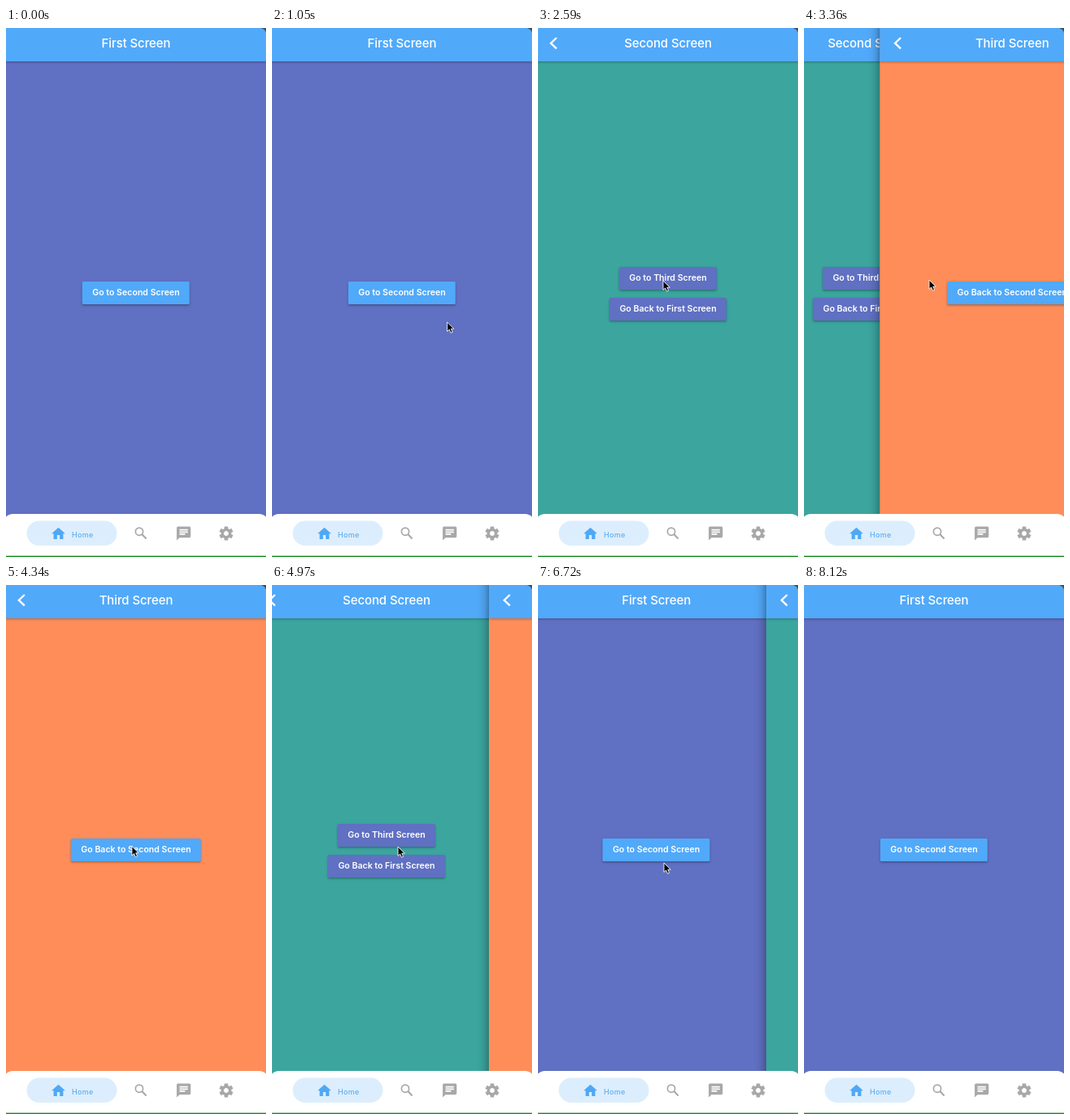
These frames come from a looping animation (320x651 px, 8.19 s). An HTML page:

```html
<!DOCTYPE html>
<html lang="en">
<head>
<meta charset="utf-8">
<title>Stacked screens</title>
<style>
  html, body { margin: 0; width: 100%; height: 100%; overflow: hidden; }
  body { position: relative; background: #6070c2; font-family: Inter, "Liberation Sans", sans-serif; }
  #stage { position: absolute; left: 0; top: 0; width: 320px; height: 651px; overflow: hidden; }
  .page { position: absolute; left: -3.5px; top: 0; width: 327px; height: 651px; background: var(--bg); }
  .page + .page::before {
    content: ""; position: absolute; right: 100%; top: 0; width: 16px; height: 100%;
    background: linear-gradient(90deg, transparent, rgba(0,0,0,.02) 30%, rgba(0,0,0,.08) 60%, rgba(0,0,0,.24));
  }
  header {
    position: absolute; left: 0; top: 0; width: 100%; height: 41px; background: #51a9f9;
    box-shadow: 0 1px 3px rgba(0,0,0,.3); color: #fff; text-align: center;
    font-size: 15px; font-weight: 500; letter-spacing: -.1px; line-height: 38px;
  }
  header svg { position: absolute; left: 0; top: 0; }
  .btn {
    position: absolute; left: 50%; height: 28px; padding: 0 12.5px; transform: translateX(-50%);
    border-radius: 1.6px; background: var(--btn); color: #fff; white-space: nowrap;
    font-size: 10.6px; font-weight: 600; line-height: 28px; box-shadow: 0 1.5px 2.5px rgba(0,0,0,.3);
  }
  .btn.down { box-shadow: 0 2px 4px rgba(0,0,0,.35), inset 0 0 0 20px rgba(0,0,0,.06); }
  #nav, #cursor { position: absolute; left: 0; top: 0; }
</style>
</head>
<body>
<div id="stage">
  <section class="page" style="--bg:#6070c2; --btn:#51a9f9">
    <header>First Screen</header>
    <div class="btn" style="top:312.3px">Go to Second Screen</div>
  </section>
  <section class="page" style="--bg:#3ba59e; --btn:#6070c2">
    <header>Second Screen</header>
    <div class="btn" style="top:293.6px">Go to Third Screen</div>
    <div class="btn" style="top:331.6px">Go Back to First Screen</div>
  </section>
  <section class="page" style="--bg:#fe8d59; --btn:#51a9f9">
    <header>Third Screen</header>
    <div class="btn" style="top:312.3px">Go Back to Second Screen</div>
  </section>

  <svg id="nav" width="320" height="651">
    <path d="M314 0H320V6Q319 1.500 314 0Z" fill="#3d4c60"/>
    <rect x="-3.500" y="598" width="327" height="70" rx="12" fill="#fff"/>
    <rect x="25.500" y="606.500" width="111" height="30.500" rx="15.250" fill="#dceefd"/>
    <path transform="translate(64.500 622) scale(.84) translate(-12 -11.700)" fill="#4fa8f5"
      d="M10 20v-6h4v6h5v-8h3L12 3 2 12h3v8z"/>
    <text x="81" y="626.700" font-size="9" letter-spacing=".3" font-weight="500" fill="#62aeef">Home</text>
    <g fill="none" stroke="#a8a8a8">
      <circle cx="164" cy="619.700" r="4.600" stroke-width="1.700"/>
      <path d="M167.300 623.100L172.600 628.400" stroke-width="2.100"/>
    </g>
    <path transform="translate(218.700 622) scale(.86) translate(-12 -12)" fill="#a8a8a8"
      d="M4 2h16a2 2 0 0 1 2 2v12a2 2 0 0 1-2 2H6l-4 4V4a2 2 0 0 1 2-2zM6 6v2h12V6zM6 9v2h12V9zM6 12v2h8v-2z" fill-rule="evenodd"/>
    <g id="gear" transform="translate(271 622)" stroke="#a8a8a8" stroke-width="4.600">
      <circle r="4.700" fill="none" stroke-width="3.400"/>
    </g>
    <rect y="649.600" width="320" height="1.400" fill="#15881c"/>
  </svg>

  <svg id="cursor" width="14" height="18" style="overflow:visible">
    <path d="M0 0V11.400L2.600 9 4.500 13.200 6.600 12.300 4.800 8.200H8.300Z" fill="#000" stroke="#fff" stroke-width=".9" stroke-linejoin="round"/>
  </svg>
</div>
<script>
const LOOP = 8190, STEP = 70, WIDTH = 327, SLIDE = 500;
const pages = [...document.querySelectorAll('.page')];
const buttons = [...document.querySelectorAll('.btn')];
const cursor = document.getElementById('cursor');

// Start of each slide, in ms, with the index of the button that triggers it
const open2 = 1645, open3 = 3214, close3 = 4782, close2 = 6510;
const taps = [[open2, 0], [open3, 1], [close3, 3], [close2, 2]];

// Pointer stops: time, x, y
const stops = [
  [700, 326, 430], [1300, 149, 321], [1960, 149, 321], [2400, 154, 311],
  [2900, 154, 311], [3200, 154, 310], [3900, 154, 310], [4400, 155, 322],
  [5300, 155, 322], [5800, 155, 342], [7050, 155, 342], [7650, 326, 430]
];

for (const page of pages.slice(1)) {
  page.querySelector('header').insertAdjacentHTML('beforeend',
    '<svg width="40" height="41"><path d="M25.800 12L18.800 18.700 25.800 25.400" fill="none" stroke="#fff" stroke-width="2.300"/></svg>');
}

const gear = document.getElementById('gear');
for (let a = 0; a < 180; a += 60) {
  gear.insertAdjacentHTML('beforeend',
    `<path d="M0-8.600V-5M0 8.600V5" transform="rotate(${a})"/>`);
}

const clamp = v => Math.max(0, Math.min(1, v));
const cubic = (a, b, s) => 3 * a * s * (1 - s) ** 2 + 3 * b * s * s * (1 - s) + s ** 3;

// Fast start, long soft landing
function ease(x) {
  if (x <= 0 || x >= 1) return clamp(x);
  let lo = 0, hi = 1;
  for (let i = 0; i < 24; i++) {
    const mid = (lo + hi) / 2;
    if (cubic(.35, .33, mid) < x) lo = mid; else hi = mid;
  }
  return cubic(.91, .97, lo);
}

const shown = (t, from, to) => ease((t - from) / SLIDE) - ease((t - to) / SLIDE);

function pointer(t) {
  const next = stops.findIndex(s => s[0] > t);
  if (next < 1) return null;
  const [t0, x0, y0] = stops[next - 1], [t1, x1, y1] = stops[next];
  const u = (t - t0) / (t1 - t0), k = u * u * (3 - 2 * u);
  return [x0 + (x1 - x0) * k, y0 + (y1 - y0) * k];
}

function draw(t) {
  const cover = [1, shown(t, open2, close2), shown(t, open3, close3), 0];
  pages.forEach((page, i) => {
    const x = WIDTH * (1 - cover[i] - cover[i + 1] / 3);
    page.style.transform = `translateX(${x}px)`;
    page.style.visibility = cover[i] > 0 ? 'visible' : 'hidden';
  });
  buttons.forEach((button, i) => {
    const down = taps.some(([at, index]) => index === i && t > at - 120 && t < at + 140);
    button.classList.toggle('down', down);
  });
  const pos = pointer(t);
  cursor.style.visibility = pos ? 'visible' : 'hidden';
  if (pos) cursor.style.transform = `translate(${pos[0]}px, ${pos[1]}px)`;
}

const start = performance.now();
function tick() {
  const t = (performance.now() - start) % LOOP;
  draw(Math.floor(t / STEP) * STEP);
  requestAnimationFrame(tick);
}
tick();
</script>
</body>
</html>
```
